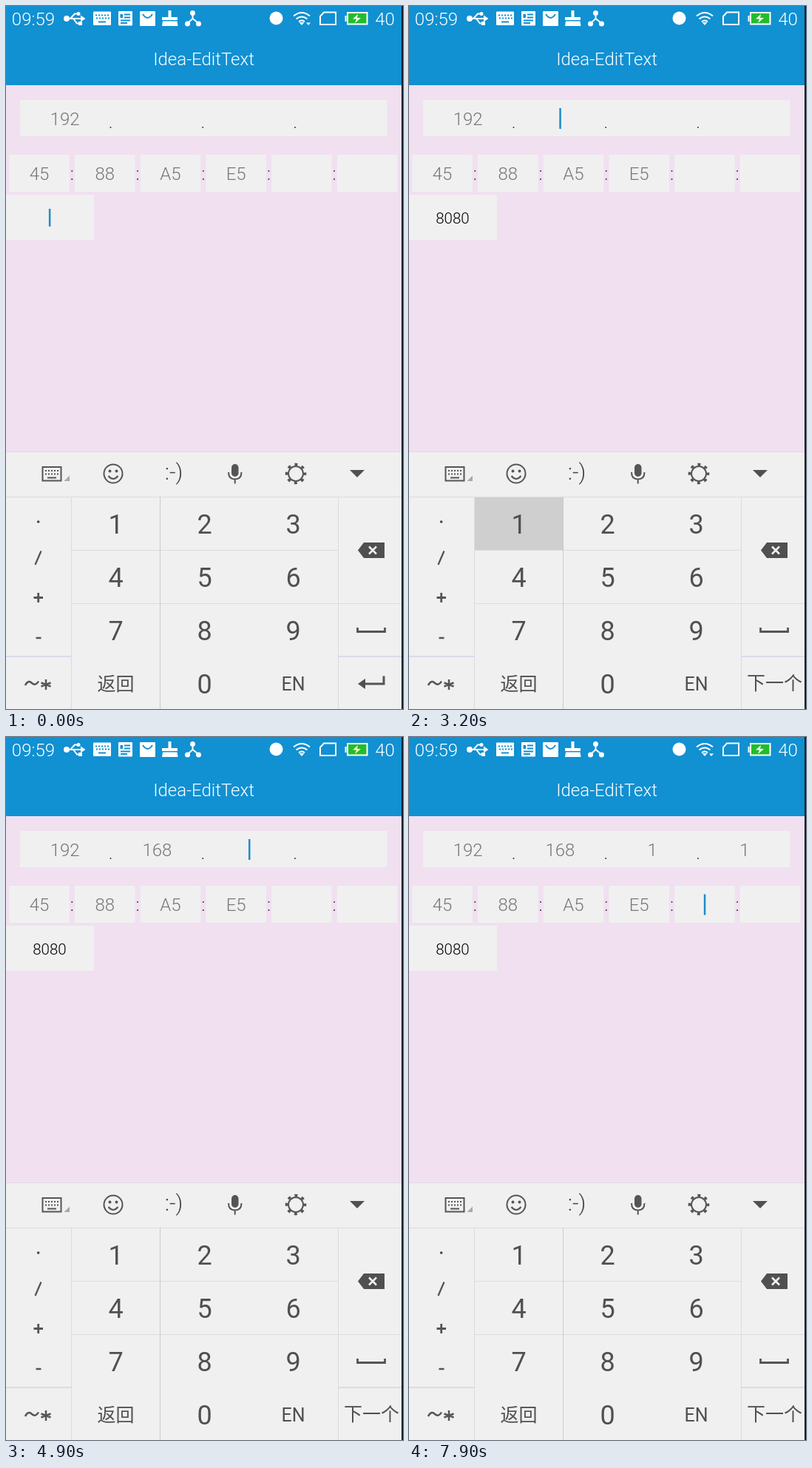
Recreate the animation shown at these times as an HTML page. Size 537 by 950 pixels, loop 8000 ms.

```html
<!DOCTYPE html>
<html lang="en">
<head>
<meta charset="utf-8">
<title>Idea-EditText</title>
<style>
  html, body { margin: 0; width: 100%; height: 100%; overflow: hidden; background: #f0e0f0; }
  svg { display: block; width: 537px; height: 950px; }
  text { font-family: Roboto, "Noto Sans CJK SC", "Noto Sans CJK", sans-serif; text-anchor: middle; }
  .bar { font-size: 24px; font-weight: 300; fill: #fff; }
  .field { font-size: 24px; font-weight: 300; fill: #777; }
  .port { font-size: 20.5px; font-weight: 300; fill: #000; }
  .sep { font-size: 24px; font-weight: 300; fill: #333; }
  .digit { font-size: 36px; fill: #505050; }
  .word { font-size: 25px; fill: #505050; }
  .box { fill: #f0f0f0; }
  .grid { stroke: #dcdce0; fill: none; }
  .white { stroke: #fff; fill: none; stroke-width: 2; }
  .dark { stroke: #555; fill: none; stroke-width: 2; }
</style>
</head>
<body>
<svg viewBox="0 0 537 950">
  <rect width="537" height="950" fill="#f0e0f0"/>
  <rect width="537" height="107" fill="#1190d2"/>

  <!-- status bar -->
  <text class="bar" x="37" y="26">09:59</text>
  <g class="white">
    <path d="M82 17H102M87 17L93 10.5H97M91 17L96 23.5H100"/>
    <g fill="#fff" stroke="none">
      <circle cx="82" cy="17" r="4"/><circle cx="98" cy="10.5" r="2.5"/>
      <path d="M101 12.5L107.500 17L101 21.500ZM98 21h5v5h-5Z"/>
      <rect x="118" y="7.500" width="24" height="18.500" rx="1"/>
      <rect x="152" y="7" width="19" height="19.500" rx="1"/>
      <rect x="181" y="7" width="21" height="20" rx="1"/>
      <path d="M219.500 6h4v9h8.500v4h-21v-4h8.500ZM212 20.500h19.500l1 6.500h-21.500Z"/>
      <circle cx="252.500" cy="9.500" r="3.500"/><circle cx="245.500" cy="24" r="3.500"/><circle cx="260.500" cy="24" r="3.500"/>
      <circle cx="365.500" cy="16.500" r="9"/>
    </g>
    <path d="M252.500 9V17L246 23M252.500 17L260 23"/>
    <g stroke="#1190d2">
      <path stroke-dasharray="2 2" d="M121 12.500H140M122 16.500H140"/>
      <path d="M125 21.500H135M160 11.500H168M160 15.500H168M155 19.500H168M155 23H164"/>
      <path d="M154.500 13.500H158" stroke-width="5"/>
      <path d="M185 11Q191.500 21 198 11"/>
    </g>
    <path d="M389 13.500Q400 4.500 411 13.500M392.500 17.500Q400 11.500 407.500 17.500M396 21.200Q400 18 404 21.200"/>
    <path d="M396.500 22L400 26L403.500 22Z" fill="#fff" stroke="none"/>
    <path id="arrow" d="M406 22.500h6l-3 3.500Z" fill="#fff" stroke="none"/>
    <path d="M430 8.500H446V25H425V14Z"/>
    <rect x="462" y="9" width="26.500" height="15.500" fill="#22bd2c"/>
    <path d="M459.500 13V21"/>
  </g>
  <path id="bolt" d="M476 11L469 17.500H474L472 23L480 16H475Z"/>
  <text class="bar" x="512.500" y="26">40</text>
  <text class="bar" x="267.500" y="80">Idea-EditText</text>

  <!-- form -->
  <rect class="box" x="19" y="127" width="496.500" height="49"/>
  <rect class="box" y="255" width="119" height="61"/>
  <g id="form"></g>
  <rect id="caret" width="2.500" fill="#1c8dc6"/>

  <!-- keyboard -->
  <rect class="box" y="602" width="535" height="348"/>
  <rect id="press" width="120.500" height="72" fill="#cfcfcf"/>
  <path class="grid" d="M0 602.500H535M0 663.500H535M88.500 663V950M449.500 663V950M89 735.500H449M89 807.500H535"/>
  <path d="M208.500 663V950" stroke="#cacacf"/>
  <path d="M0 879H88M449 879H535" stroke="#d5d5ec" stroke-width="1.500"/>
  <g id="keys"></g>

  <g class="dark">
    <rect x="49.500" y="623" width="25" height="18.500"/>
    <path stroke-dasharray="2 2" d="M53 628H72M53 632.500H72"/><path d="M56 637.500H68"/>
    <path d="M86 634.500V642H78.500Z" fill="#aaa" stroke="none"/>
    <circle cx="145" cy="632" r="12.500"/>
    <path d="M138.500 635Q145 643 151.500 635"/>
    <circle cx="140.500" cy="628.500" r="1" /><circle cx="149.500" cy="628.500" r="1"/>
    <rect x="305" y="619" width="9.500" height="17" rx="4.700" fill="#555" stroke="none"/>
    <path d="M301 630Q301 639.500 309.700 639.500Q318.500 639.500 318.500 630M309.700 639.500V645.500"/>
    <circle cx="392" cy="632" r="10"/>
    <circle cx="392" cy="632" r="12.500" stroke-width="3.500" stroke-dasharray="4 5.817" stroke-dashoffset="2"/>
    <path d="M465 627H485L475 637Z" fill="#505050" stroke="none"/>
    <path d="M476 735.500L484 725H512V746H484Z" fill="#505050" stroke="none"/>
    <path d="M491 730.500L501 740.500M501 730.500L491 740.500" stroke="#f0f0f0" stroke-width="2.500"/>
    <path d="M475.500 840V845.500H512.500V840" stroke-width="2.800"/>
    <path d="M37.500 799.500H50M43.700 793V806" stroke-width="2.800"/>
    <path d="M40.500 854H47.500M39.500 755L47.500 736.500" stroke-width="2.300"/>
    <circle cx="43.700" cy="697" r="1.800" fill="#444" stroke="none"/>
    <path d="M54 910V924M47.500 914.500L60.500 919.500M60.500 914.500L47.500 919.500M26 918Q30 910 35 915Q40 919.500 44 912.500" stroke-width="2.500"/>
    <g id="enter">
      <path d="M511 905.500V916H484" stroke-width="3"/>
      <path d="M476 916L486 909V923Z" fill="#505050" stroke="none"/>
    </g>
  </g>
  <text x="227" y="640" font-size="30" font-weight="300" fill="#444">:-)</text>
  <text class="word" id="next" x="494.500" y="924">下一个</text>

  <rect x="535" width="2" height="950" fill="#16202c"/>
</svg>

<script>
const LOOP = 8000;
const $ = id => document.getElementById(id);

function add(parent, tag, attrs, content = '') {
  const el = document.createElementNS('http://www.w3.org/2000/svg', tag);
  for (const name in attrs) el.setAttribute(name, attrs[name]);
  el.textContent = content;
  return $(parent).appendChild(el);
}
const label = (parent, cls, x, y, content) => add(parent, 'text', { class: cls, x, y }, content);

// Each field: centre x, caret top and height, digit width
const fields = { port: { x: 59, top: 274, h: 24, digit: 11.5 } };
fields.port.el = label('form', 'port', 59, 294, '');

for (let i = 0; i < 4; i++) {
  const x = 79.7 + i * 124.7;
  fields['ip' + i] = { x, top: 138, h: 28, digit: 13.5, el: label('form', 'field', x, 160.5, i ? '' : '192') };
  if (i) label('form', 'sep', 17 + i * 124.7, 164.5, '.');
}

['45', '88', 'A5', 'E5', '', ''].forEach((value, i) => {
  const left = 4.3 + i * 88.7;
  const x = left + 40.8;
  add('form', 'rect', { class: 'box', x: left, y: 201, width: 81.5, height: 50 });
  fields['mac' + i] = { x, top: 212.5, h: 28, digit: 13.5, el: label('form', 'field', x, 235, value) };
  if (i) label('form', 'sep', left - 3.7, 235, ':');
});

const pad = ['1', '2', '3', '4', '5', '6', '7', '8', '9', '返回', '0', 'EN'];
const column = i => 88.5 + (i % 3) * 120;
const row = i => 663 + Math.floor(i / 3) * 72;
pad.forEach((name, i) => {
  const word = name.length > 1;
  label('keys', word ? 'word' : 'digit', column(i) + 60, row(i) + (word ? 45.5 : 49.5), name);
});

const events = [
  [0, { port: '', ip1: '', ip2: '', ip3: '', key: '', focus: 'port', on: 1, next: 0, wifi: 1, pale: 0 }],
  [100, { on: 0 }],
  [400, { on: 1, key: '8', wifi: 0, pale: 1 }],
  [500, { key: '', port: '8' }],
  [600, { key: '0' }],
  [700, { key: '', port: '80' }],
  [800, { key: '8' }],
  [1000, { key: '', port: '808', pale: 0 }],
  [1100, { key: '0' }],
  [1300, { key: '', port: '8080', pale: 1 }],
  [1600, { on: 0, pale: 0 }],
  [1900, { on: 1, pale: 1 }],
  [2400, { focus: 'ip1', next: 1, wifi: 1 }],
  [2800, { on: 0 }],
  [3200, { on: 1, key: '1', wifi: 0, pale: 0 }],
  [3500, { key: '', ip1: '1', pale: 1 }],
  [3600, { pale: 0 }],
  [3800, { key: '6', pale: 1 }],
  [4000, { key: '', ip1: '16', pale: 0 }],
  [4100, { key: '8' }],
  [4400, { key: '', ip1: '168', focus: 'ip2' }],
  [4600, { on: 0 }],
  [4900, { on: 1, pale: 1 }],
  [5400, { key: '1', pale: 0 }],
  [5600, { key: '', ip2: '1', wifi: 1, pale: 1 }],
  [5800, { on: 0 }],
  [6200, { wifi: 0 }],
  [6500, { on: 1 }],
  [6600, { focus: 'ip3' }],
  [6800, { on: 0 }],
  [7100, { on: 1, key: '1', wifi: 1, pale: 0 }],
  [7300, { key: '', ip3: '1', pale: 1 }],
  [7500, { pale: 0 }],
  [7700, { on: 0 }],
  [7900, { on: 1, focus: 'mac4' }]
];

const show = (id, visible) => $(id).setAttribute('visibility', visible ? 'visible' : 'hidden');

function place(id, attrs) {
  for (const name in attrs) $(id).setAttribute(name, attrs[name]);
}

function draw(time) {
  const state = {};
  for (const [start, change] of events) if (start <= time) Object.assign(state, change);

  for (const name of ['port', 'ip1', 'ip2', 'ip3']) fields[name].el.textContent = state[name];

  const field = fields[state.focus];
  const typed = (state[state.focus] || '').length;
  place('caret', { x: field.x + typed * field.digit / 2 - 1.1, y: field.top, height: field.h });
  show('caret', state.on);

  const key = pad.indexOf(state.key);
  if (key >= 0) place('press', { x: column(key), y: row(key) });
  show('press', key >= 0);

  show('next', state.next);
  show('enter', !state.next);
  show('arrow', state.wifi);
  place('bolt', { fill: state.pale ? '#fbf6b4' : '#fff' });
}

let origin;
function tick(now) {
  origin ??= now;
  draw((now - origin) % LOOP);
  requestAnimationFrame(tick);
}
draw(0);
requestAnimationFrame(tick);
</script>
</body>
</html>
```
